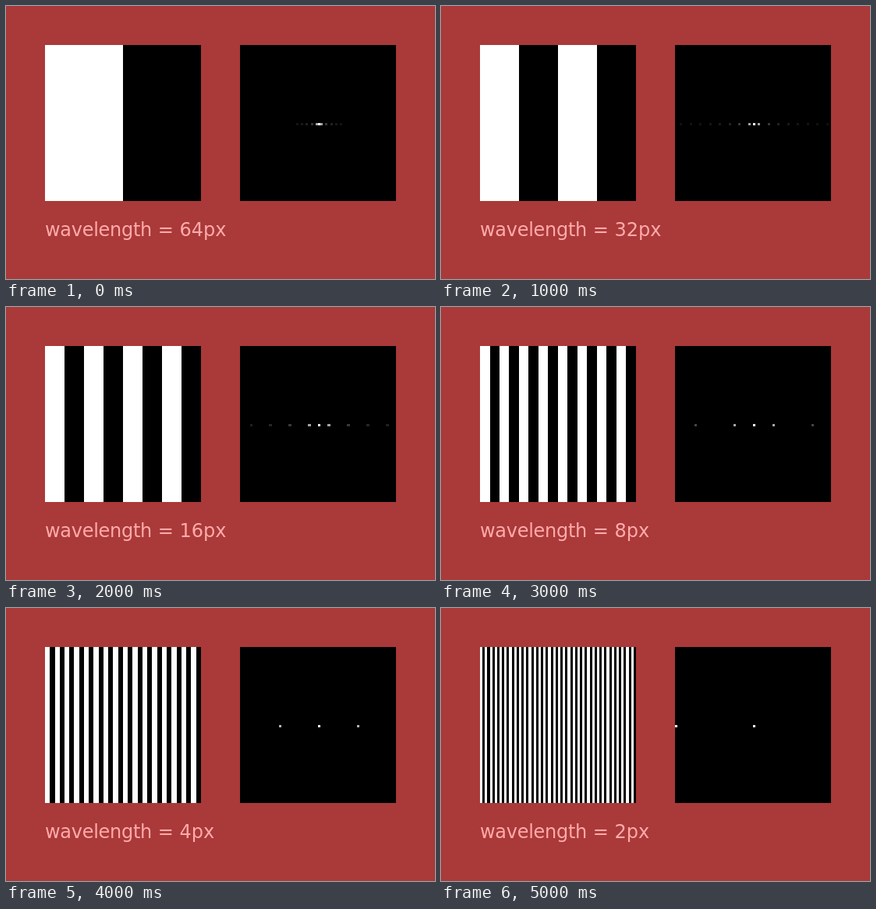
Write an HTML page that moves like this. It is 550x350 px and loops after 6 s.

```html
<!DOCTYPE html>
<html lang="en">
<head>
<meta charset="utf-8">
<title>Square wave and its spectrum</title>
<style>
  html, body { margin: 0; width: 100%; height: 100%; overflow: hidden; background: #aa3939; }
  svg { display: block; width: 550px; height: 350px; }
  text { font: 24px "DejaVu Sans", sans-serif; fill: #ffaaaa; white-space: pre; }
  .word { letter-spacing: -0.28px; }
</style>
</head>
<body>
<svg viewBox="0 0 550 350" shape-rendering="crispEdges">
  <rect x="50" y="50" width="200" height="200"/>
  <rect x="300" y="50" width="200" height="200"/>
  <g id="stripes" transform="translate(50 50)" fill="#fff"></g>
  <g id="spectrum" transform="translate(300 50)"></g>
  <text x="50" y="295"><tspan class="word">wavelength</tspan><tspan id="value"> = 64px</tspan></text>
</svg>
<script>
const SAMPLES = 64, SIZE = 200, STEP_MS = 1000;
const WAVELENGTHS = [64, 32, 16, 8, 4, 2];
const [stripes, spectrum, value] =
  ['stripes', 'spectrum', 'value'].map(id => document.getElementById(id));

// Pixel edge of a sample; the tiny drift settles how exact halves round.
const edge = i => Math.round(i * SIZE / SAMPLES - (i - 5) * 1e-6);

function block(col, cols, row, rows, fill) {
  const x = edge(col), y = edge(row);
  return `<rect x="${x}" y="${y}" width="${edge(col + cols) - x}" height="${edge(row + rows) - y}"` +
    (fill ? ` fill="${fill}"/>` : '/>');
}

function dot(col, level) {
  const v = Math.round(level);
  return block(col, 1, SAMPLES / 2, 1, `rgb(${v},${v},${v})`);
}

function drawStripes(wavelength) {
  let out = '';
  for (let i = 0; i < SAMPLES; i += wavelength) out += block(i, wavelength / 2, 0, SAMPLES);
  return out;
}

// A sampled square wave holds the mean and its odd harmonics only.
function drawSpectrum(wavelength) {
  const centre = SAMPLES / 2, spacing = SAMPLES / wavelength;
  let out = dot(centre, 255);
  for (let k = 1; k * spacing <= centre; k += 2) {
    const level = 255 * 2 / (wavelength * Math.sin(Math.PI * k / wavelength));
    if (level < 16) continue;
    for (const col of [centre - k * spacing, centre + k * spacing]) {
      if (col < SAMPLES) out += dot(col, level);
    }
  }
  return out;
}

let shown = -1;
function tick(now) {
  const step = Math.floor(now / STEP_MS) % WAVELENGTHS.length;
  if (step !== shown) {
    shown = step;
    const wavelength = WAVELENGTHS[step];
    stripes.innerHTML = drawStripes(wavelength);
    spectrum.innerHTML = drawSpectrum(wavelength);
    value.textContent = ` = ${wavelength}px`;
  }
  requestAnimationFrame(tick);
}
tick(performance.now());
</script>
</body>
</html>
```
